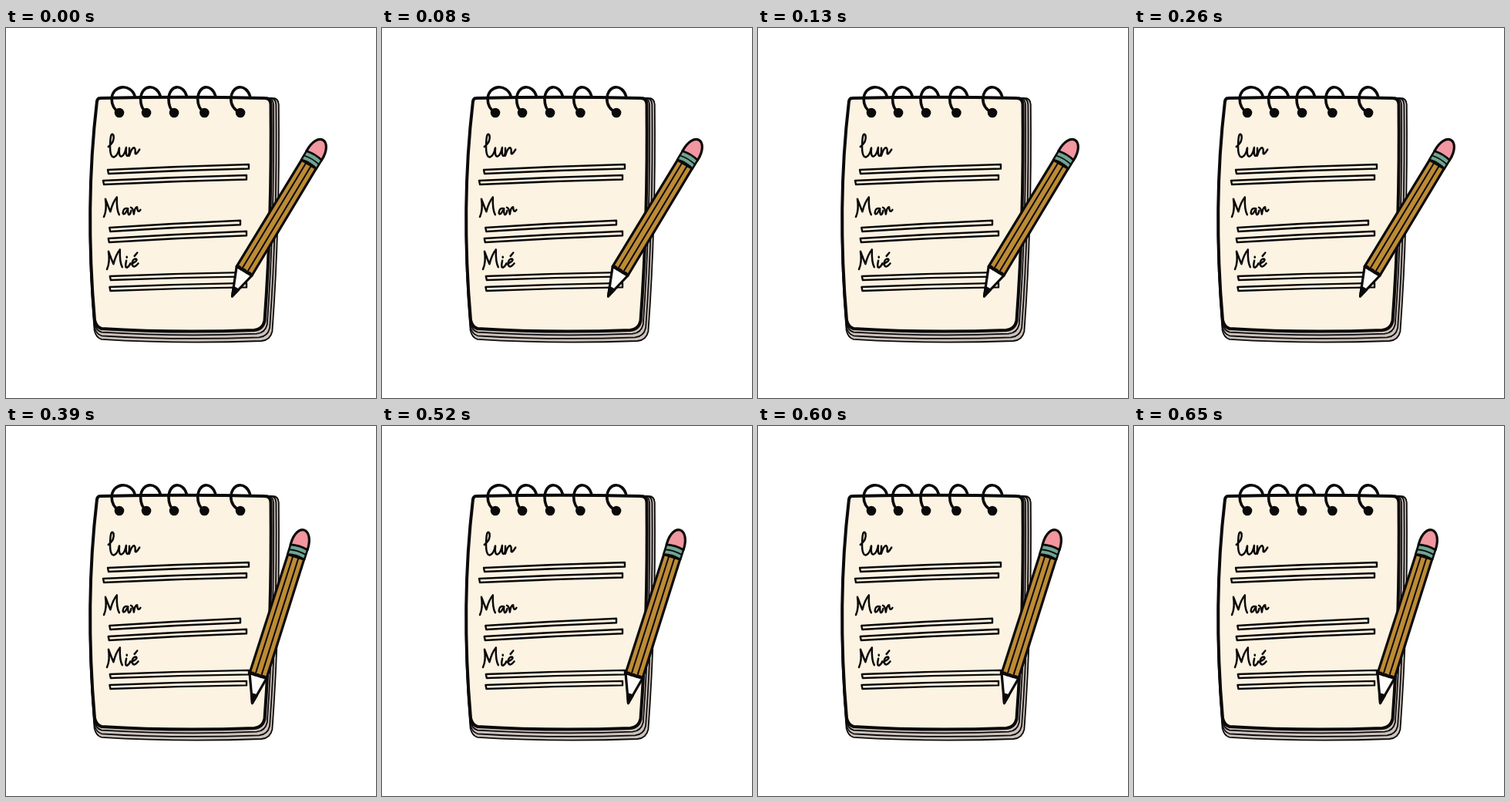
Write an HTML page that moves like this. It is 480 px wide and 480 px high and loops after 780 ms.

```html
<!DOCTYPE html>
<html lang="es">
<head>
<meta charset="utf-8">
<title>Agenda</title>
<style>
html, body { margin: 0; width: 100%; height: 100%; overflow: hidden; background: #fff; }
svg { display: block; width: 100vw; height: 100vh; }
.ink { fill: none; stroke: #0b0a0a; stroke-linecap: round; stroke-linejoin: round; }
.solid { fill: #0b0a0a; }
</style>
</head>
<body>
<svg viewBox="0 0 480 480">
  <defs>
    <path id="sheet" d="M122 91Q230 88.500 336 91Q343 91 343.500 99Q345 250 335.500 380Q333 391 322 392Q220 396 124 390Q117 388 115 379Q102 230 118 95Q119 91 122 91Z"/>
  </defs>
  <g id="pages" class="ink"></g>
  <g id="rings" class="ink" stroke-width="3.600"></g>
  <g id="bars" class="ink" stroke-width="2.400"></g>
  <g id="words" class="ink" stroke-width="2.500"></g>
  <!-- pencil, tip at the origin -->
  <g id="pencil" class="ink" stroke-width="3.200">
    <path fill="#fffdf9" d="M0 0L-15 -36H8Z"/>
    <path class="solid" d="M0 0L-4.500 -11H2.500Z"/>
    <path fill="#bd8b35" d="M-15 -36L-14 -198H8V-36Q4 -39 0 -36Q-4 -39 -8 -36Q-12 -39 -15 -36Z"/>
    <path stroke-width="2" d="M-7.500 -38L-7 -197M0.500 -38V-197"/>
    <path fill="#f2969f" d="M-14.500 -211C-16 -242 9 -242 8.500 -211Z"/>
    <path fill="#70a492" stroke-width="2.600" d="M-14.500 -198V-211Q-3 -214 8.500 -211V-198Q-3 -201 -14.500 -198Z"/>
    <path stroke-width="1.800" d="M-14 -204.500Q-3 -207 8 -204.500"/>
  </g>
</svg>
<script>
const byId = id => document.getElementById(id);
const add = (id, markup) => byId(id).insertAdjacentHTML('beforeend', markup);

// Each page behind the first is a little larger, growing from the top left corner.
for (let i = 3; i >= 0; i--) {
  add('pages', `<use href="#sheet" fill="${i ? '#cbc1bb' : '#fdf3e2'}" stroke-width="${i ? 1.7 : 4}"
    transform="translate(122 91) scale(${1 + i * 0.0155}) translate(-122 -91)"/>`);
}

for (let i = 0; i < 5; i++) {
  const x = 147 + 35 * i + i ** 4 / 15;
  const left = x - 7 - (i - 1.7) ** 2;
  const right = x + 20 - 1.9 * i;
  add('rings', `<circle class="solid" cx="${x}" cy="110" r="4.500"/>
    <path d="M${x} 110Q${left} 104 ${left} 92C${left + 1} 73 ${right - 5} 72 ${right} 88"/>`);
}

// Two hand-drawn bars below each day.
function bar(x, y, end, rise) {
  const mid = (x + end) / 2, my = y - rise / 2 - 1;
  add('bars', `<path d="M${x} ${y}Q${mid} ${my} ${end} ${y - rise}v5.500Q${mid} ${my + 5} ${x + 1} ${y + 5}Z"/>`);
}
for (let day = 0; day < 3; day++) {
  for (let k = 0; k < 2; k++) {
    bar(135 - (3 + 6 * k) / 4 ** day,
        184 + 81 * day - 6 * day * day + 14 * k,
        309.5 + 2.5 * k + 5.5 * (1 - k) * Math.cos(Math.PI * day),
        7 + 2.5 * Math.sin(2 * day));
  }
}

// Pen strokes and advance width of each letter, baseline at 0.
const glyphs = {
  l: [14, 'M0 -14Q9 -20 8 -28Q5 -34 3 -20Q0 0 6 0Q11 -1 14 -11'],
  u: [12, 'M0 -11Q-2 0 2 0Q6 -1 9 -11Q7 0 10 0Q12 -1 13 -6'],
  n: [14, 'M1 -10L0 0Q4 -10 7 -10Q9 -9 8 -3Q8 1 14 -7'],
  M: [24, 'M0 0Q5 -9 4 -23Q7 -12 9 -6Q13 -18 19 -24Q17 -8 20 -1'],
  a: [11, 'M8 -8Q2 -10 1 -3Q2 2 8 -8Q7 0 9 0Q11 -1 12 -5'],
  r: [12, 'M1 -9Q4 -8 4 0Q6 -9 9 -9Q9 0 13 -5'],
  i: [8, 'M2 -9Q-1 0 2 0Q5 -1 7 -5M3 -14v1'],
  é: [10, 'M0 -4Q9 -7 7 -10Q2 -11 1 -4Q2 3 9 -4M5 -14l4 -4']
};
function write(word, x, y) {
  let pen = 0;
  const strokes = [...word].map(c => {
    const [width, d] = glyphs[c];
    pen += width;
    return `<path d="${d}" transform="translate(${pen - width})"/>`;
  });
  add('words', `<g role="img" aria-label="${word}" transform="translate(${x} ${y}) rotate(-5)">${strokes.join('')}</g>`);
}
write('lun', 134, 168);
write('Mar', 127, 245);
write('Mié', 131, 313);

const LOOP = 780;
const poses = ['translate(293.500 348) rotate(31)', 'translate(319.500 359.500) rotate(17.500)'];

function draw(now) {
  const pose = now % LOOP < LOOP / 2 ? 0 : 1;
  byId('pencil').setAttribute('transform', poses[pose]);
  requestAnimationFrame(draw);
}
draw(0);
</script>
</body>
</html>
```
